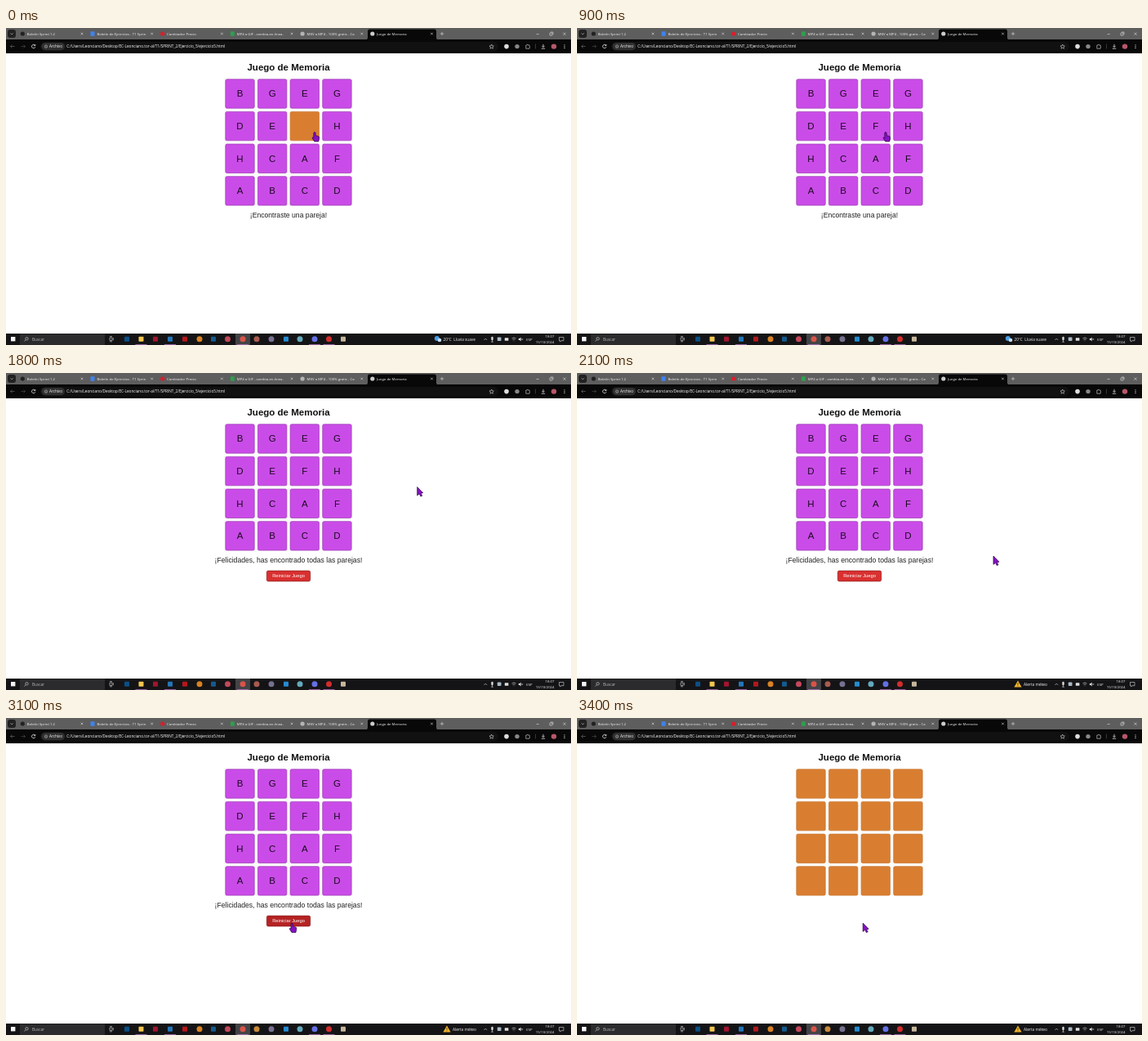
Recreate the animation shown at these times as an HTML page. Size 692 by 388 pixels, loop 3600 ms.

```html
<!DOCTYPE html>
<html lang="es">
<head>
<meta charset="utf-8">
<title>Juego de Memoria</title>
<style>
  html, body { margin: 0; width: 100%; height: 100%; overflow: hidden; background: #fff; }
  svg { display: block; width: 100vw; height: 100vh; }
  text { font-family: "Liberation Sans", Arial, sans-serif; }
  .ui text { font-family: "Open Sans", "Noto Sans", sans-serif; font-weight: 500; }
  .line { fill: none; stroke: #ddd; stroke-width: .6; }
</style>
</head>
<body>
<svg id="stage" viewBox="0 0 692 388"></svg>
<script>
const LOOP = 3600, STEP = 100;
const ORANGE = [217, 126, 49], PURPLE = [202, 76, 232];
const LETTERS = "BGEGDEFHHCAFABCD";
const LAST_CARD = 6;
const SIZE = 36.04, PITCH = 39.64, LEFT = 268.5, TOP = 62.45;
const BUTTON = { x: 319, y: 241.8, w: 54, h: 13.4 };

// Pointer tip, one point per step from 1400 ms on
const PATH_START = 1400;
const PATH = [
  [378, 127.5], [384, 129], [424, 134], [468, 137], [503.7, 139.5],
  [515, 170], [517.5, 204], [510, 224], [489, 245], [457, 256],
  [410, 257.5], [388.5, 256], [368, 257], [353, 252], [350.2, 251]
];

const text = (x, y, s, size, fill = "#f4f4f4", more = "") =>
  `<text x="${x}" y="${y}" font-size="${size}" fill="${fill}" ${more}>${s}</text>`;
const rect = (x, y, w, h, fill, r = 0, more = "") =>
  `<rect x="${x}" y="${y}" width="${w}" height="${h}" rx="${r}" fill="${fill}" ${more}/>`;
const dot = (x, y, r, fill, more = "") =>
  `<circle cx="${x}" cy="${y}" r="${r}" fill="${fill}" ${more}/>`;
const line = (d, more = "") => `<path class="line" d="${d}" ${more}/>`;
const cross = (x, y, r) => line(`M${x - r} ${y - r}l${2 * r} ${2 * r}m0 ${-2 * r}l${-2 * r} ${2 * r}`);
const MIDDLE = 'text-anchor="middle"', END = 'text-anchor="end"';

function browserBar() {
  const tabs = [
    ["Boletín Sprint 1.2", "#222"],
    ["Boletín de Ejercicios - T1 Sprin", "#3f82ee"],
    ["Cambiador Precio", "#d81f2c"],
    ["MP4 a GIF - cambia-en-linea-", "#2f9e4f"],
    ["MKV a MP4 - 100% gratis - Ca", "#b5b5b5"],
    ["Juego de Memoria", "#ccc"]
  ];
  let out = rect(0, 0, 692, 14, "#5e5e5e") + rect(0, 14, 692, 17, "#080808") +
    `<path d="M440 14.5q3 0 3-3V4q0-2.5 2.5-2.5h79q2.5 0 2.5 2.5v7.5q0 3 3 3z" fill="#080808"/>` +
    rect(2, 2, 10, 10, "#222", 3) + line("M5.6 6.4l1.5 1.5 1.5-1.5");
  tabs.forEach(([title, color], i) => {
    const x = 20.3 + 85.7 * i;
    out += (i === 1 || i === 3 ? rect(x - 2.5, 4.2, 5, 5.6, color, .5) : dot(x, 7, 2.6, color)) +
      text(x + 5.4, 8.6, title, 4.3) + cross(x + 72.7, 7, 1.3);
  });
  out += line("M534 4.8v4.4m-2.2-2.2h4.4M649.5 7.5h3.2") + cross(684, 7.2, 1.6) +
    line("M666 6h3v3h-3zm1-1h3v3") +
    line("M10.5 22.5h-5m2-2-2 2 2 2", 'style="stroke:#777"') +
    line("M18.5 22.5h5m-2-2 2 2-2 2", 'style="stroke:#555"') +
    line("M35.5 21.2a2.2 2.2 0 1 0 .3 2m.1-3.2v1.6h-1.7", 'style="stroke-width:.8"') +
    rect(42, 17, 561, 11.3, "#111", 5.6) + rect(43.5, 18, 28.5, 9.2, "#303030", 4.6) +
    dot(49, 22.6, 1.7, "none", 'stroke="#ddd" stroke-width=".5"') + line("M49 22.4v1.1m0-1.9v.2") +
    text(53, 24.1, "Archivo", 4.6, "#fff") +
    text(74.3, 24.1, "C:/Users/Leonciano/Desktop/EC-Leonciano.tor-al/T1/SPRINT_2/Ejercicio_5/ejercicio5.html", 4.7, "#fff") +
    line("M594.7 20l.8 1.8 1.9.2-1.4 1.3.4 1.9-1.7-1-1.7 1 .4-1.9-1.4-1.3 1.9-.2z") +
    dot(613, 22.6, 2.8, "#ddd") + dot(626, 22.6, 2.7, "#888") +
    line("M636.8 21h1.4q.7-1.8 1.4 0h1.5v1.5q1.6.6 0 1.3v1.4h-4.3z") +
    line("M648.5 19.5v6", 'style="stroke:#555"') +
    line("M658 19.8v3.6m-1.6-1.5 1.6 1.6 1.6-1.6m-3.8 3.3h4.4", 'style="stroke-width:.8"') +
    dot(671, 22.6, 3.2, "#b9566a") +
    [20.8, 22.6, 24.4].map(y => dot(684, y, .55, "#eee")).join("");
  return out;
}

function taskbar() {
  // center x, color, shape: s = square, c = circle
  const icons = [
    [148, "#0b4f86", "s"], [165.5, "#f4c64f", "s"], [183, "#a3142f", "s"], [201, "#2476b8", "s"],
    [219, "#b5171d", "s"], [237, "#d98224", "c"], [254, "#145a8e", "s"], [271.5, "#c4485a", "c"],
    [290, "#d9534a", "c"], [307, "#a85b50", "c"], [325, "#77708f", "c"], [343, "#258bd2", "s"],
    [360, "#64a9bd", "c"], [378, "#6570e8", "c"], [395.5, "#d42c2c", "c"], [413, "#c6b79a", "s"]
  ];
  let out = rect(0, 374, 692, 14, "#141416") + rect(6, 378, 5.4, 5.4, "#f3f3f3") +
    rect(17, 374.5, 104, 13.5, "#2b2b2d") +
    dot(25.5, 380.3, 1.7, "none", 'stroke="#ddd" stroke-width=".6"') + line("M24.3 381.6l-2 2") +
    text(32, 382.7, "Buscar", 4.7, "#bbb") +
    line("M127 379h3v3.4h-3zm4.3 0v3.4m-4.3-4.8h3m-3 6.2h3") +
    rect(281, 374, 18, 14, "#434346");
  icons.forEach(([x, color, shape]) => {
    const id = x === 307 ? 'id="changingIcon"' : "";
    out += shape === "s" ? rect(x - 3, 377.7, 6, 6, color, .8, id) : dot(x, 380.7, 3.5, color, id);
  });
  [165.5, 201, 290, 378, 395.5].forEach(x => out += rect(x - 7, 387.2, 14, .8, "#b873c4"));
  out += `<g id="weather">` + dot(527.8, 380, 3, "#4c9de0") + dot(531, 382, 2.3, "#c5ddf2") +
    text(535.5, 382.5, "20°C&#160; Lluvia suave", 4.7) + `</g>` +
    `<g id="alert"><path d="M540 376.5l4.6 8h-9.2z" fill="#f3b52b"/>` +
    line("M540 379.2v2.5m0 .8v.8", 'style="stroke:#222;stroke-width:.8"') +
    text(547, 382.5, "Alerta méteo", 4.8) + `</g>` +
    line("M585.4 382l1.9-1.9 1.9 1.9") +
    rect(594.3, 377.8, 2.4, 4.4, "#ddd", 1.2) + line("M595.5 382v2.2m-1.5 0h3") +
    rect(601.8, 378.4, 4.7, 4.7, "#a9bac5", .8) +
    rect(610.8, 379.3, 4.6, 3.4, "#ddd", .5) +
    line("M619.5 380q2.5-2.2 5 0m-4 1.5q1.5-1.2 3 0m-1.5 1.3v.5") +
    `<path d="M627.8 380h1.3l1.5-1.5v5l-1.5-1.5h-1.3z" fill="#ddd"/>` + cross(632.2, 381, .8) +
    text(637.3, 382.5, "ESP", 4.3) + text(671.5, 379.4, "18:07", 4.3, "#eee", END) +
    text(671.5, 385.7, "15/10/2024", 4.3, "#eee", END) +
    line("M677.5 378.5h5.5v4.2h-3l-1.3 1.4v-1.4h-1.2z");
  return out;
}

const cards = [...LETTERS].map((letter, i) => ({
  letter, x: LEFT + i % 4 * PITCH, y: TOP + Math.floor(i / 4) * PITCH, w: SIZE, h: SIZE
}));

const stage = document.getElementById("stage");
stage.innerHTML = rect(0, 0, 692, 388, "#fff") +
  text(346, 51.9, "Juego de Memoria", 11.53, "#111", MIDDLE + ' font-weight="bold"') +
  cards.map(c => `<g class="card">` +
    rect(c.x + .3, c.y + .3, SIZE - .6, SIZE - .6, "#000", 1.7, 'stroke-width=".7"') +
    text(c.x + SIZE / 2, c.y + 21.9, c.letter, 11.53, "#1c0c22", MIDDLE) + `</g>`).join("") +
  text(346, 232.2, "", 8.65, "#222", MIDDLE + ' id="message"') +
  `<g id="restart">` +
  rect(BUTTON.x + .3, BUTTON.y + .3, BUTTON.w - .6, BUTTON.h - .6, "#d93030", 1.8, 'stroke="#8f1d1d" stroke-width=".7"') +
  text(346, 250.2, "Reiniciar Juego", 5.77, "#fff", MIDDLE) + `</g>` +
  `<g class="ui">${browserBar()}${taskbar()}</g>` +
  `<g id="pointer" fill="#8512c2" stroke="#2b0640" stroke-width=".7" stroke-linejoin="round">` +
  `<path id="arrow" d="M0 0V10.4L2.5 8.3 4.2 11.6 6 10.7 4.4 7.7 7 7.2Z"/>` +
  `<path id="hand" d="M0 0Q1.2 0 1.2 1.4V4.2L4.1 4.8Q5.8 5.2 5.6 7L4.8 11.4H-.3L-2.9 7.3Q-3.2 5.6-1.2 6.9V1.4Q-1.2 0 0 0Z"/></g>`;

const el = id => document.getElementById(id);
const show = (node, on) => node.setAttribute("opacity", +on);
const clamp = v => Math.max(0, Math.min(1, v));
const rgb = c => `rgb(${c.map(Math.round)})`;
const inside = ([x, y], b) => x >= b.x && x <= b.x + b.w && y >= b.y && y <= b.y + b.h;
const cardNodes = [...stage.querySelectorAll(".card")];

function pointerAt(t) {
  const i = Math.round((t - PATH_START) / STEP);
  return PATH[Math.max(0, Math.min(PATH.length - 1, i))];
}

function draw(t) {
  const restarted = t >= 3300, won = t >= 1100 && !restarted;
  cardNodes.forEach((node, i) => {
    const flipped = restarted ? 0 : i === LAST_CARD ? clamp(t / 300) : 1;
    const color = ORANGE.map((v, k) => v + (PURPLE[k] - v) * flipped);
    const [box, letter] = node.children;
    box.setAttribute("fill", rgb(color));
    box.setAttribute("stroke", rgb(color.map(v => v * (.92 - .16 * flipped))));
    show(letter, flipped > 0);
  });
  el("message").textContent = restarted ? "" :
    won ? "¡Felicidades, has encontrado todas las parejas!" : "¡Encontraste una pareja!";

  const tip = pointerAt(t), onButton = won && inside(tip, BUTTON);
  const pointing = onButton || cards.some(c => inside(tip, c));
  show(el("restart"), won);
  el("restart").firstChild.setAttribute("fill", onButton ? "#b52323" : "#d93030");
  el("pointer").setAttribute("transform", `translate(${tip})`);
  show(el("hand"), pointing);
  show(el("arrow"), !pointing);

  show(el("weather"), clamp((1700 - t) / 200));
  show(el("alert"), clamp((t - 1800) / 200));
  el("changingIcon").setAttribute("fill", t < 2700 ? "#a85b50" : "#c98a3c");
}

function tick() {
  draw(Math.floor(performance.now() % LOOP / STEP) * STEP);
  requestAnimationFrame(tick);
}
tick();
</script>
</body>
</html>
```
